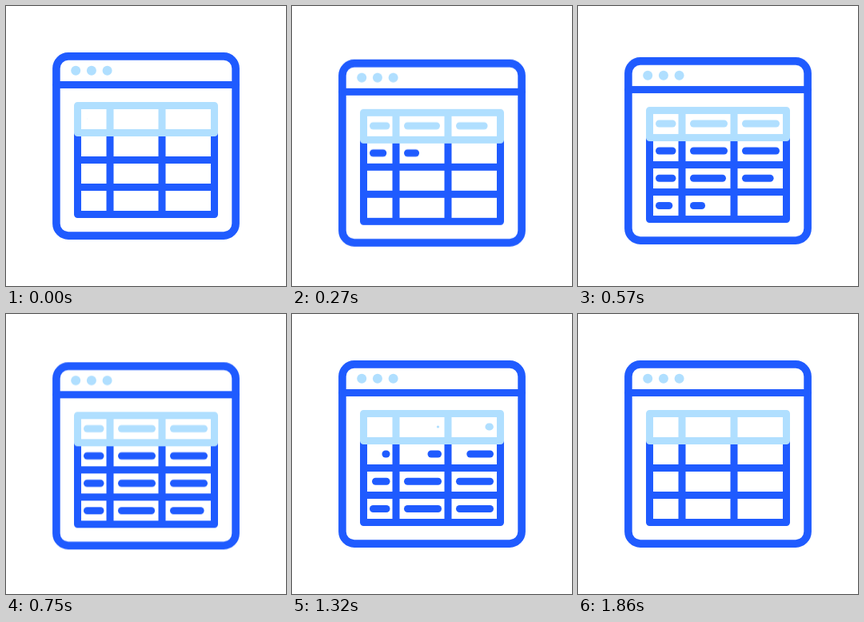
Animation of 350x350 px, one loop 2000 ms. Source, as an HTML page without scripts:

```html
<!DOCTYPE html>
<html lang="en">
<head>
<meta charset="utf-8">
<title>Table filling</title>
<style>
  html, body { margin: 0; width: 100%; height: 100%; overflow: hidden; background: #fff; }
  svg { display: block; width: 100vw; height: 100vh; }
  .dark { --ink: #1f5bff; }
  .light { --ink: #b0dfff; }
  .line { fill: none; stroke: var(--ink); stroke-width: 9; stroke-linecap: round; stroke-linejoin: round; }
  .dots { fill: var(--ink); }

  .window { animation: dip 2s infinite; }
  @keyframes dip {
    0% { transform: translateY(0); animation-timing-function: cubic-bezier(.333, 0, .3, 1); }
    16.67% { transform: translateY(9px); animation-timing-function: cubic-bezier(.333, 0, .3, 1); }
    58.33%, 100% { transform: translateY(0); }
  }

  /* each bar draws in from the left, then erases towards the right */
  .bars line {
    stroke: var(--ink);
    stroke-linecap: round;
    stroke-dasharray: 1 2;
    animation: trim 2s infinite both, weight 2s infinite both;
    animation-delay: calc(var(--row) * 150ms + var(--col) * 66.7ms);
  }
  .bars line:nth-child(1) { --col: 0; }
  .bars line:nth-child(2) { --col: 1; }
  .bars line:nth-child(3) { --col: 2; }
  @keyframes trim {
    0% { stroke-dashoffset: 1; animation-timing-function: cubic-bezier(.27, 0, .1, 1); }
    15% { stroke-dashoffset: 0; animation-timing-function: linear; }
    48.75% { stroke-dashoffset: 0; animation-timing-function: cubic-bezier(.27, 0, .1, 1); }
    63.75%, 100% { stroke-dashoffset: -1; }
  }
  @keyframes weight {
    0% { stroke-width: 0; animation-timing-function: ease-out; }
    2.5% { stroke-width: 9px; }
    58.75% { stroke-width: 9px; animation-timing-function: cubic-bezier(.4, 0, .8, .6); }
    63.75%, 100% { stroke-width: 0; }
  }
</style>
</head>
<body>
<svg viewBox="0 0 350 350">
  <g class="window">
    <g class="dark">
      <rect class="line" x="62.9" y="62.9" width="224.2" height="224.2" rx="15" style="stroke-width:9.6"/>
      <path class="line" d="M63 98.5H287"/>
      <path class="line" d="M89.5 158.5V260.5H260.5V158.5M130 158.5V260.5M195 158.5V260.5M89.5 192.5H260.5M89.5 226.5H260.5"/>
    </g>
    <g class="light">
      <path class="line" d="M89.5 124.5H260.5V158.5H89.5ZM130 124.5V158.5M195 124.5V158.5"/>
      <g class="dots">
        <circle cx="87.2" cy="80.8" r="6"/>
        <circle cx="106.9" cy="80.8" r="6"/>
        <circle cx="126.6" cy="80.8" r="6"/>
      </g>
    </g>

    <g class="bars light" transform="translate(0 141)" style="--row:0">
      <line x1="101.5" x2="118" pathLength="1"/>
      <line x1="144.5" x2="182.5" pathLength="1"/>
      <line x1="209.5" x2="247.5" pathLength="1"/>
    </g>
    <g class="bars dark" transform="translate(0 175)" style="--row:1">
      <line x1="101.5" x2="118" pathLength="1"/>
      <line x1="144.5" x2="182.5" pathLength="1"/>
      <line x1="209.5" x2="247.5" pathLength="1"/>
    </g>
    <g class="bars dark" transform="translate(0 209.3)" style="--row:2">
      <line x1="101.5" x2="118" pathLength="1"/>
      <line x1="144.5" x2="182.5" pathLength="1"/>
      <line x1="209.5" x2="247.5" pathLength="1"/>
    </g>
    <g class="bars dark" transform="translate(0 243.5)" style="--row:3">
      <line x1="101.5" x2="118" pathLength="1"/>
      <line x1="144.5" x2="182.5" pathLength="1"/>
      <line x1="209.5" x2="247.5" pathLength="1"/>
    </g>
  </g>
</svg>
</body>
</html>
```
